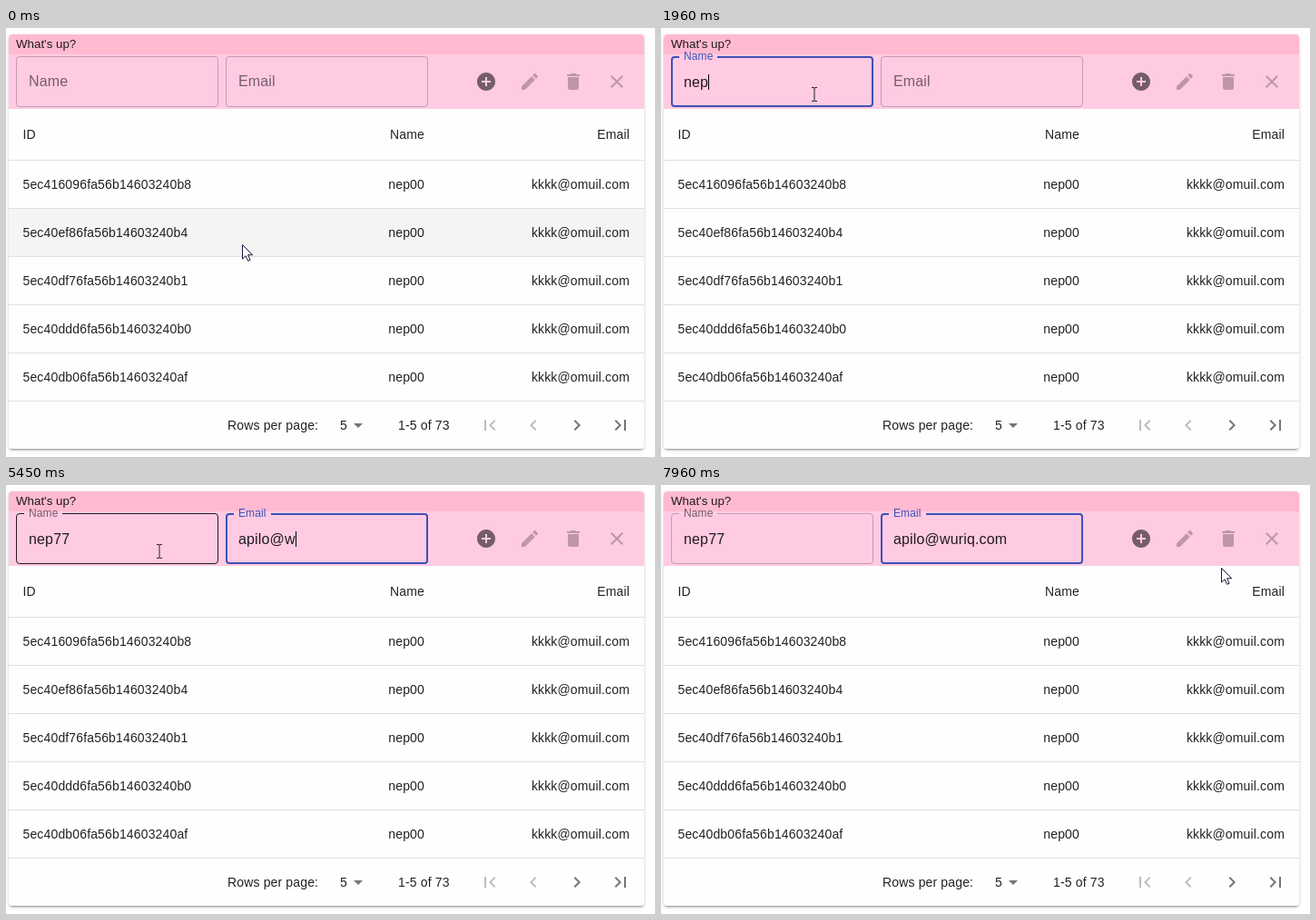
An HTML page for the animation above (8000 ms loop, 715 by 472 pixels).

```html
<!DOCTYPE html>
<html lang="en">
<head>
<meta charset="utf-8">
<title>User table</title>
<style>
html, body { margin: 0; width: 100%; height: 100%; overflow: hidden; background: #fff; }
#stage {
  position: relative; width: 715px; height: 472px; overflow: hidden;
  font: 14px/20px "Liberation Sans", Arial, sans-serif;
  letter-spacing: .15px; color: rgba(0,0,0,.87); white-space: pre;
}
#stage div, #stage svg, .field * { position: absolute; }
.paper {
  left: 3px; top: 7px; width: 700px; height: 456px; border-radius: 4px; background: #fdfefe;
  box-shadow: 0 3px 1px -2px rgba(0,0,0,.2), 0 2px 2px rgba(0,0,0,.14), 0 1px 5px rgba(0,0,0,.12);
}
.bar { left: 3px; top: 29px; width: 700px; height: 60px; background: #ffcbe3; }
.title {
  left: 3px; top: 7px; width: 692px; height: 22px; padding-left: 8px; border-radius: 4px 4px 0 0;
  background: #ffbad2; font-size: 13.333px; line-height: 21px; letter-spacing: 0;
}
.row { left: 3px; width: 700px; border-bottom: 1px solid #e0e0e0; }
.row div { top: 16px; }
.id { left: 15.5px; }
.name { right: 242px; }
.email { right: 16px; }
.field { width: 223px; height: 56px; top: 31px; font-size: 16px; }
.field i { inset: 0; border: 1px solid; border-radius: 4px; }
.field u { left: 9px; top: 0; height: 2px; background: #ffcbe3; }
.field label { left: 14px; top: 0; line-height: 16px; transform-origin: 0 0; }
.field span { left: 14px; top: 18.5px; line-height: 19px; height: 19px; }
.field b { left: 100%; top: 1.5px; width: 1px; height: 17px; background: #000; }
#spot { width: 22px; height: 22px; left: 157px; top: 62px; border-radius: 50%; background: #fbdf70; }
#stage svg { overflow: visible; }
</style>
</head>
<body>
<div id="stage">
  <div class="paper"></div>
  <div class="bar"></div>
  <div class="title">What's up?</div>
</div>
<script>
const LOOP = 8000, BLINK = 540, STEP = 80;
const stage = document.getElementById('stage');

function add(html) {
  stage.insertAdjacentHTML('beforeend', html);
  return stage.lastElementChild;
}

// Table
function addRow(top, height, cells, lineHeight) {
  const [id, name, email] = cells;
  return add(`<div class="row" style="top:${top}px;height:${height}px;line-height:${lineHeight}px">` +
    `<div class="id">${id}</div><div class="name">${name}</div><div class="email">${email}</div></div>`);
}
addRow(89, 56, ['ID', 'Name', 'Email'], 24);
const rows = ['416096fa56b14603240b8', '40ef86fa56b14603240b4', '40df76fa56b14603240b1',
  '40ddd6fa56b14603240b0', '40db06fa56b14603240af']
  .map((id, i) => addRow(146 + 53 * i, 52, ['5ec' + id, 'nep00', 'kkkk@omuil.com'], 20));

// Footer
[[244, 'Rows per page:'], [368, '5'], [432, '1-5 of 73']]
  .forEach(([x, text]) => add(`<div style="left:${x}px;top:427px">${text}</div>`));

// Icons, 24px, placed by their centre
function addIcon(x, y, alpha, path) {
  add(`<svg width="24" height="24" style="left:${x - 12}px;top:${y - 12}px"><path fill-opacity="${alpha}" d="${path}"/></svg>`);
}
addIcon(529, 59, .54, 'M12 2C6.48 2 2 6.48 2 12s4.48 10 10 10 10-4.48 10-10S17.52 2 12 2zm5 11h-4v4h-2v-4H7v-2h4V7h2v4h4v2z');
addIcon(577, 59, .26, 'M3 17.25V21h3.75L17.81 9.94l-3.75-3.75L3 17.25zM20.71 7.04c.39-.39.39-1.02 0-1.41l-2.34-2.34c-.39-.39-1.02-.39-1.41 0l-1.83 1.83 3.75 3.75 1.83-1.83z');
addIcon(625, 59, .26, 'M6 19c0 1.1.9 2 2 2h8c1.1 0 2-.9 2-2V7H6v12zM19 4h-3.5l-1-1h-5l-1 1H5v2h14V4z');
addIcon(673, 59, .26, 'M19 6.41L17.59 5 12 10.59 6.41 5 5 6.41 10.59 12 5 17.59 6.41 19 12 13.41 17.59 19 19 17.59 13.41 12z');
addIcon(388, 437, .54, 'M7 10l5 5 5-5z');
addIcon(533, 437, .26, 'M18.41 16.59L13.82 12l4.59-4.59L17 6l-6 6 6 6zM6 6h2v12H6z');
addIcon(581, 437, .26, 'M15.41 16.59L10.83 12l4.58-4.59L14 6l-6 6 6 6z');
addIcon(629, 437, .54, 'M8.59 16.59L13.17 12 8.59 7.41 10 6l6 6-6 6z');
addIcon(677, 437, .54, 'M5.59 7.41L10.18 12l-4.59 4.59L7 18l6-6-6-6zM16 6h2v12h-2z');

// Text fields
function addField(left, title, text, focus, blur, keys) {
  const el = add(`<div class="field" style="left:${left}px"><i></i><u></u><label>${title}</label><span><q></q><b></b></span></div>`);
  const [border, notch, label, value] = el.children;
  value.innerHTML = '<s style="position:static;text-decoration:none"></s><b></b>';
  return { left, text, focus, blur, keys, border, notch, label, typed: value.firstChild, caret: value.lastChild };
}
const fields = [
  addField(11, 'Name', 'nep77', 560, 2590, [1720, 1800, 1960, 2270, 2430]),
  addField(242, 'Email', 'apilo@wuriq.com', 2590, LOOP,
    [3670, 3820, 4210, 4370, 4680, 5060, 5450, 5610, 5920, 6000, 6160, 6470, 6780, 6860, 7100])
];

// Pointer
const spot = add('<div id="spot"></div>');
const arrow = add('<svg width="12" height="19"><path d="M.5.5v15.6l3.6-3.4 2.5 5.6 2.4-1-2.4-5.6h5z" fill="#fff" stroke="#17173a"/></svg>');
const beam = add('<svg width="8" height="16"><path d="M1 .5h2.2l.8.6.8-.6H7M4 1v14M1 15.5h2.2l.8-.6.8.6H7" fill="none" stroke="#222"/></svg>');

const clamp = x => Math.min(1, Math.max(0, x));

// cubic-bezier(0, 0, .2, 1)
function easeOut(x) {
  x = clamp(x);
  let lo = 0, hi = 1;
  for (let i = 0; i < 20; i++) {
    const m = (lo + hi) / 2;
    if (.6 * (1 - m) * m * m + m ** 3 < x) lo = m; else hi = m;
  }
  return 3 * (1 - lo) * lo * lo + lo ** 3;
}

// Moving passages advance in steps, like a screen recording
function snap(t) {
  for (const [a, b] of [[70, 790], [2590, 2820], [7640, LOOP]])
    if (t >= a && t < b) return a + Math.floor((t - a) / STEP) * STEP;
  return t;
}

const exitPath = [[168, 73], [290, 80], [520, 96], [703, 98], [617, 91]];
function pointerAt(t) {
  if (t >= 7640) return exitPath[Math.min(4, Math.floor((t - 7640) / STEP))];
  const p = t < 70 ? 0 : clamp((t + 10) / 480);
  const k = p * p * (3 - 2 * p);
  return [Math.round(260 - 92 * k), Math.round(238 - 165 * k)];
}

function tint(k) {
  return `rgba(${63 * k},${81 * k},${181 * k},${.54 + .46 * k})`;
}

function drawField(f, t, x, y) {
  const focused = t >= f.focus && t < f.blur;
  const over = x >= f.left && x < f.left + 223 && y >= 31 && y < 87;
  const lift = t < f.focus ? 0 : easeOut((t - f.focus + 10) / 200);
  const fade = t < f.blur ? 0 : easeOut((t - f.blur + 10) / 200);
  const count = f.keys.filter(k => k <= t).length;
  const last = count ? f.keys[count - 1] : f.focus;

  f.border.style.borderWidth = focused ? '2px' : '1px';
  f.border.style.borderColor = focused ? '#3f51b5' : `rgba(0,0,0,${over ? .87 : .23})`;
  f.notch.style.width = lift > .4 ? f.label.offsetWidth * .75 + 10 + 'px' : '0';
  f.label.style.transform = `translateY(${20 - 26 * lift}px) scale(${1 - .25 * lift})`;
  f.label.style.color = tint(lift * (1 - fade));
  f.typed.textContent = f.text.slice(0, count);
  f.caret.style.opacity = focused && Math.floor((t - last) / BLINK) % 2 === 0 ? 1 : 0;
  return over;
}

function draw(t) {
  const [x, y] = pointerAt(t);
  const over = fields.map(f => drawField(f, t, x, y)).includes(true);
  rows.forEach((row, i) => {
    const top = 146 + 53 * i;
    row.style.background = y >= top && y < top + 53 ? '#f4f4f3' : '';
  });
  arrow.style.display = over ? 'none' : '';
  beam.style.display = over ? '' : 'none';
  arrow.style.left = x + 'px';
  arrow.style.top = y + 'px';
  beam.style.left = x - 3.5 + 'px';
  beam.style.top = y - 8 + 'px';
  spot.style.display = t >= 550 && t < 710 ? '' : 'none';
}

const start = performance.now();
function frame() {
  draw(snap((performance.now() - start) % LOOP));
  requestAnimationFrame(frame);
}
frame();
</script>
</body>
</html>
```
